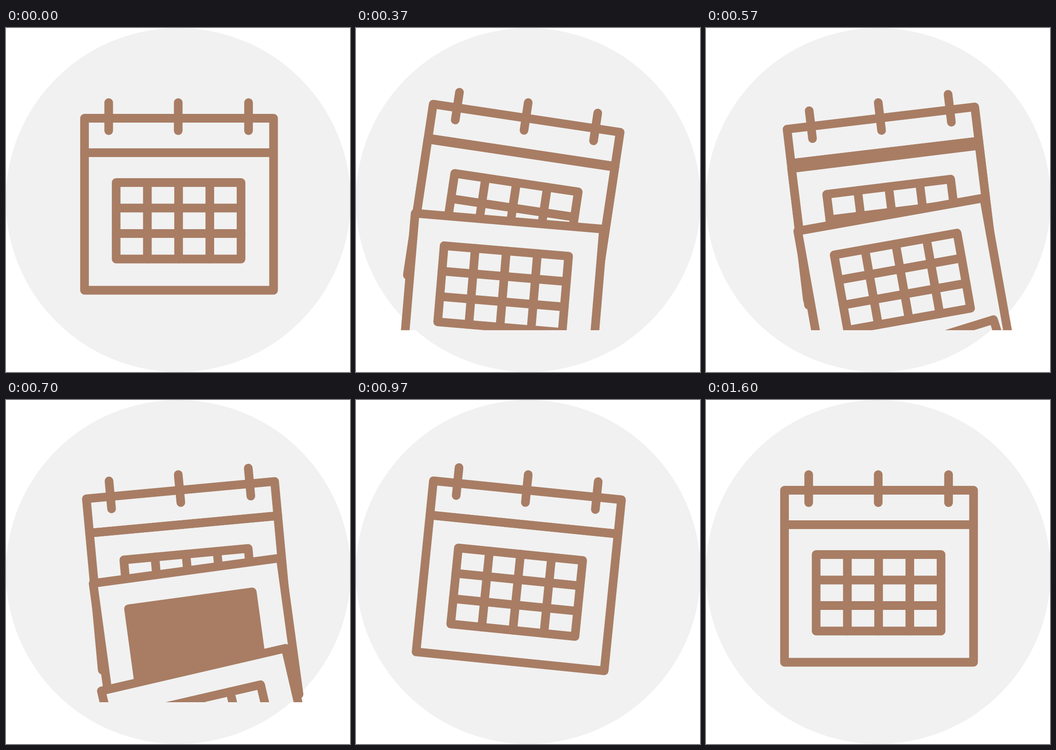
These frames come from a looping animation (747 px wide and 749 px high, 1670 ms). An HTML page with a canvas:

```html
<!DOCTYPE html>
<html lang="en">
<head>
<meta charset="utf-8">
<title>Calendar</title>
<style>
  html, body { margin: 0; width: 100%; height: 100%; overflow: hidden; background: #fff; }
  canvas { display: block; }
</style>
</head>
<body>
<canvas id="stage" width="747" height="749"></canvas>
<script>
const ctx = document.getElementById('stage').getContext('2d');
const LOOP = 1670, STEP = 100 / 3, LAST_STEP = 49;
const BROWN = '#a87d64', PALE = '#f1f1f1';
const PIVOT = { x: 374, y: 162 };
const PAGE = { x: 170.5, y: 271.5, w: 410.5, h: 299.5 };
const GRID = { x: 239.2, y: 336.5, w: 271.2, h: 166.5, cols: 4, rows: 3 };
const MARK = { x: 268.3, y: 362, r: 60.5, start: -31 };

// Times are in steps of 1/30 s, angles in degrees.
const SWING = [[1.5, 0], [10, 9.2], [18, -7.4], [29.4, 5.8], [35, 0]];
const PAGE_STARTS = [15.1, 10.15, 3.75];
const SOLID_FROM = 21;

const rad = deg => deg * Math.PI / 180;
const clamp = v => Math.min(1, Math.max(0, v));
const ease = v => (1 - Math.cos(Math.PI * clamp(v))) / 2;

function swingAt(k) {
  for (let i = 1; i < SWING.length; i++) {
    const [t0, a] = SWING[i - 1], [t1, b] = SWING[i];
    if (k < t1) return a + (b - a) * ease((k - t0) / (t1 - t0));
  }
  return 0;
}

// Accelerates for eight steps, then falls at constant speed.
function dropAt(age) {
  return age < 8 ? 2.9 * age * age : 185.6 + 46 * (age - 8);
}

function line(x1, y1, x2, y2) {
  ctx.beginPath();
  ctx.moveTo(x1, y1);
  ctx.lineTo(x2, y2);
  ctx.stroke();
}

function drawGrid(solid) {
  const { x, y, w, h, cols, rows } = GRID;
  ctx.strokeRect(x, y, w, h);
  if (solid) {
    ctx.fillStyle = BROWN;
    ctx.fillRect(x, y, w, h);
    return;
  }
  for (let i = 1; i < cols; i++) line(x + w * i / cols, y, x + w * i / cols, y + h);
  for (let i = 1; i < rows; i++) line(x, y + h * i / rows, x + w, y + h * i / rows);
}

function drawPage(drop, solid) {
  const cx = PAGE.x + PAGE.w / 2;
  ctx.save();
  ctx.translate(cx - 0.025 * drop, PAGE.y + drop);
  ctx.rotate(rad(-0.0246 * drop));
  ctx.translate(-cx, -PAGE.y);
  ctx.fillStyle = PALE;
  ctx.fillRect(PAGE.x, PAGE.y, PAGE.w, PAGE.h);
  ctx.strokeRect(PAGE.x, PAGE.y, PAGE.w, PAGE.h);
  drawGrid(solid);
  ctx.restore();
}

function drawHeader() {
  ctx.strokeRect(PAGE.x, 196.5, PAGE.w, PAGE.y - 196.5);
  for (const x of [223, 374, 526.7]) line(x, 162.3, x, 223.5);
}

function drawMark(k) {
  const head = ease((k - 29.5) / 6.5), tail = ease((k - 37) / 11);
  if (head <= tail) return;
  ctx.beginPath();
  ctx.arc(MARK.x, MARK.y, MARK.r, rad(MARK.start + 360 * tail), rad(MARK.start + 360 * head));
  ctx.stroke();
}

function draw(k) {
  ctx.fillStyle = '#fff';
  ctx.fillRect(0, 0, 747, 749);
  ctx.fillStyle = PALE;
  ctx.beginPath();
  ctx.arc(374, 374.5, 374.5, 0, 2 * Math.PI);
  ctx.fill();

  ctx.save();
  ctx.beginPath();
  ctx.rect(0, 0, 747, 658);
  ctx.clip();
  ctx.translate(PIVOT.x, PIVOT.y);
  ctx.rotate(rad(k < 3 ? 0 : swingAt(k)));
  ctx.translate(-PIVOT.x, -PIVOT.y);
  ctx.strokeStyle = BROWN;
  ctx.lineWidth = 18.8;
  ctx.lineCap = ctx.lineJoin = 'round';

  drawPage(0, false);
  PAGE_STARTS.forEach((start, i) => {
    const age = k - start;
    if (age > 0 && age < 18) drawPage(dropAt(age), i === 0 && k >= SOLID_FROM);
  });
  drawHeader();
  drawMark(k);
  ctx.restore();
}

const origin = performance.now();
function tick() {
  const t = (performance.now() - origin) % LOOP;
  draw(Math.min(LAST_STEP, Math.floor((t + 3.5) / STEP)));
  requestAnimationFrame(tick);
}
tick();
</script>
</body>
</html>
```
